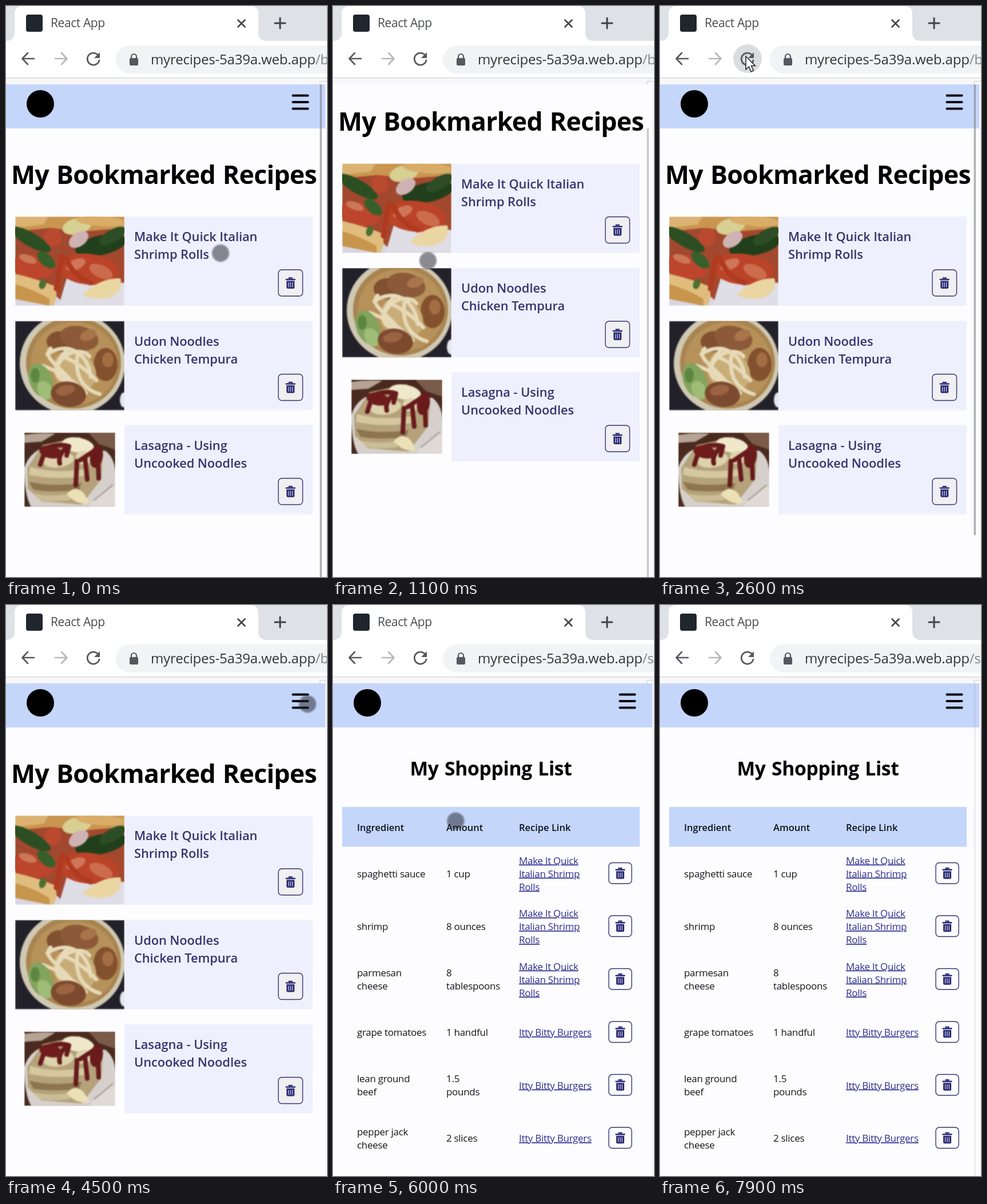
Write an HTML page that moves like this. It is 561 px wide and 998 px high and loops after 8 s.

```html
<!DOCTYPE html>
<html lang="en">
<head>
<meta charset="utf-8">
<title>Recipe app</title>
<style>
html, body { margin: 0; width: 100%; height: 100%; overflow: hidden; background: #fff; }
svg { display: block; width: 561px; height: 998px; }
text { font-family: "Open Sans", "Noto Sans", sans-serif; white-space: pre; }
.h1 { font-weight: 700; font-size: 44.5px; letter-spacing: -.65px; word-spacing: 2px; }
.h2 { font-weight: 700; font-size: 33.6px; letter-spacing: -.3px; word-spacing: 2px; }
.card { font-weight: 600; font-size: 21.8px; letter-spacing: -.05px; fill: #35356f; }
.cell { font-size: 17px; letter-spacing: -.3px; fill: #161616; }
.link { fill: #2d2d90; text-decoration: underline; }
.head { font-weight: 600; font-size: 16.5px; fill: #0e1018; }
.menu { font-size: 22px; fill: #d3d4ea; }
.tab { font-size: 21px; letter-spacing: -.4px; fill: #4a4d52; }
.url { font-size: 24px; letter-spacing: -.2px; fill: #33363a; }
.line { fill: none; stroke-linecap: round; stroke-linejoin: round; }
.soft { filter: blur(1.2px); }
</style>
</head>
<body>
<svg id="stage" viewBox="0 0 561 998"></svg>
<script>
const NAVY = '#2a2b73', SKY = '#c5d6fb';

const text = (x, y, cls, str) => `<text x="${x}" y="${y}" class="${cls}">${str}</text>`;
const rect = (x, y, w, h, fill, more = '') =>
  `<rect x="${x}" y="${y}" width="${w}" height="${h}" fill="${fill}" ${more}/>`;
const oval = (x, y, rx, ry, fill, turn = 0) =>
  `<ellipse rx="${rx}" ry="${ry}" fill="${fill}" transform="translate(${x} ${y}) rotate(${turn})"/>`;
const line = (d, color, w) => `<path class="line" d="${d}" stroke="${color}" stroke-width="${w}"/>`;
const shape = (d, fill) => `<path d="${d}" fill="${fill}"/>`;

function trashButton(x, y, w, h, fill) {
  const cx = x + w / 2, cy = y + h / 2;
  return rect(x, y, w, h, fill, 'rx="6" stroke="#34356f" stroke-width="1.4"') +
    `<g transform="translate(${cx} ${cy})">` +
    line('M-7.5 -6H7.5M-2.6 -8.6H2.6', NAVY, 2.4) +
    shape('M-7 -3.6H7V7.5Q7 10 4.5 10H-4.5Q-7 10 -7 7.5Z', NAVY) +
    line('M-3.4 -.5V7M0 -.5V7M3.4 -.5V7', '#c4c4de', 1.3) + '</g>';
}

// Simplified dishes, each drawn in a box with its corner at 0,0.
const rolls = rect(0, 0, 191, 156, '#a2482e') +
  shape('M0 112L60 128L90 156H0Z', '#d9d6e2') + shape('M76 156L90 108L191 116V156Z', '#dfdde6') +
  shape('M0 0H191V20L120 26L60 20L0 26Z', '#c9954f') + shape('M0 0H58L50 14L0 20Z', '#dcb272') +
  oval(108, 17, 26, 14, '#d8cf93', -14) + oval(150, 8, 44, 9, '#d9ac68', 4) +
  oval(27, 40, 40, 12, '#2b4f22', 30) + oval(150, 50, 46, 17, '#213f1b', -12) +
  oval(170, 34, 26, 11, '#2c4d25', -30) +
  oval(66, 36, 15, 16, '#b9492f') + oval(111, 40, 19, 12, '#cfb3b4', -35) +
  oval(30, 88, 38, 20, '#bd452b', 10) + oval(128, 92, 54, 27, '#bb4327', 6) +
  oval(106, 84, 18, 9, '#cf7658', -24) + oval(150, 96, 22, 11, '#cb6c4d', 25) +
  oval(22, 74, 16, 7, '#cb7757', 20) + oval(54, 76, 19, 10, '#35602a', 42) +
  shape('M0 100Q42 110 70 122Q76 142 66 156Q26 150 0 140Z', '#e0bd7e') +
  shape('M0 118Q34 128 60 144L60 156L0 144Z', '#c8954c') +
  shape('M118 136Q150 106 184 108Q190 132 164 142Q136 148 118 136Z', '#ead6a2') +
  line('M90 74Q100 104 132 116M82 70Q76 100 72 126', '#b03a20', 9) + oval(48, 118, 6, 9, '#4b702f', 20);

const udon = rect(0, 0, 191, 156, '#22212a') +
  oval(100, 74, 92, 89, '#cfc8b2') + oval(102, 73, 83, 80, '#a98450') +
  oval(103, 74, 76, 72, '#b6915a') + oval(78, 36, 23, 18, '#805031') +
  oval(112, 30, 34, 21, '#8c5a38', 12) + oval(158, 76, 21, 29, '#84512f') +
  oval(128, 25, 15, 9, '#a8744c', -20) + oval(162, 68, 10, 13, '#a36e44') +
  oval(104, 88, 40, 34, '#c9ad78', 40) +
  line('M56 58C92 34 128 56 132 98M62 48C44 66 88 84 102 112M72 84C82 52 118 46 130 62M92 50C64 74 66 108 96 103M110 54C104 82 108 116 148 128M48 78Q92 94 124 126M82 62Q112 72 142 104', '#e6dab9', 6.5) +
  oval(45, 104, 20, 31, '#83a45d', -22) + oval(52, 121, 12, 17, '#9fbd76', -30) +
  oval(35, 95, 8, 13, '#5d8640') + oval(93, 128, 31, 22, '#7d4a30', 8) +
  oval(88, 121, 17, 9, '#9a6341', -12) + oval(190, 138, 7, 13, '#e5e7ee');

const lasagna = rect(0, 0, 159, 130, '#4a2a1e') +
  shape('M0 4Q26 0 54 2L30 16L0 18Z', '#b5a494') + shape('M112 0H159V30L130 20Z', '#7a5a48') +
  shape('M0 62Q8 36 34 26L142 32Q159 46 159 72V130H12Q0 110 0 62Z', '#d5d0cb') +
  shape('M5 62L32 22L96 8L138 36L134 82L100 126L30 120L6 98Z', '#b5a27a') +
  shape('M10 60Q58 74 112 62L104 76Q58 84 8 74Z', '#d5c8a0') +
  shape('M8 86Q54 96 100 88L96 100Q50 106 16 100Z', '#8d7550') +
  shape('M14 106Q50 114 82 106L80 118Q46 122 28 118Z', '#cbbd95') +
  oval(60, 48, 27, 13, '#ddd2ac', -8) + oval(94, 22, 28, 13, '#efe8ca', 10) +
  oval(104, 44, 14, 12, '#e0d4ae') +
  line('M32 30Q58 18 78 24L74 40M36 32L28 56M74 26Q58 40 62 54M98 48Q116 36 128 28L130 80M106 44L110 82M92 50L90 92', '#661a1b', 8) +
  oval(46, 34, 20, 11, '#6e1c1c', 12) + oval(126, 42, 11, 20, '#691a1b', 10) +
  shape('M74 108Q88 90 104 106L114 123Q92 128 74 108Z', '#ece0b6') +
  shape('M114 130Q126 102 159 94V130Z', '#dfdad6') + line('M122 118L154 92', '#a89f97', 2.5);

const photo = (x, y, w, h, art) =>
  `<svg x="${x}" y="${y}" width="${w}" height="${h}" style="width:${w}px;height:${h}px"><g class="soft">${art}</g></svg>`;

const header = rect(0, 137, 558, 77, SKY) + '<circle cx="60" cy="171" r="24"/>' +
  line('M501.500 156.500H527.500M501.500 168H527.500M501.500 179.500H527.500', '#08080c', 4.2);

const cards = [
  [368, 'Make It Quick Italian', 'Shrimp Rolls', photo(16, 368, 191, 156, rolls)],
  [550.5, 'Udon Noodles', 'Chicken Tempura', photo(16, 550.5, 191, 156.5, udon)],
  [732.5, 'Lasagna - Using', 'Uncooked Noodles', photo(32, 745.5, 159, 130, lasagna)]
].map(([y, a, b, art]) =>
  rect(207, y, 329, 156, '#eff0fd') + art + text(224, y + 43, 'card', a) +
  text(224, y + 74, 'card', b) + trashButton(476, y + 93, 42.5, 46, '#f0eff1')).join('');

// Stacked lines centred on cy.
const cell = (x, cy, lines, cls = '') => lines.split('|').map((s, i, all) =>
  text(x, cy + 6 + (i - (all.length - 1) / 2) * 23, 'cell ' + cls, s)).join('');

const roll = 'Make It Quick|Italian Shrimp|Rolls', burger = 'Itty Bitty Burgers';
const rows = [
  ['spaghetti sauce', '1 cup', roll],
  ['shrimp', '8 ounces', roll],
  ['parmesan|cheese', '8|tablespoons', roll],
  ['grape tomatoes', '1 handful', burger],
  ['lean ground|beef', '1.5|pounds', burger],
  ['pepper jack|cheese', '2 slices', burger],
  ['spicy brown|mustard', '2|tablespoons', burger],
  ['', '', roll]
].map(([item, amount, link], i) => {
  const cy = 469.5 + i * 92.5;
  return cell(42, cy, item) + cell(198, cy, amount) + cell(325, cy, link, 'link') +
    trashButton(482, cy - 19, 40, 36.5, '#fdfdff');
}).join('');

const browser = rect(0, 0, 561, 137, '#f8f8fa') + rect(0, 0, 561, 62, '#dee1e6') +
  shape('M0 61Q15 61 15 46V14Q15 0 29 0H427Q441 0 441 14V46Q441 61 456 61H561V126H0Z', '#fff') +
  rect(0, 125, 561, 1.6, '#dadbde') +
  rect(35, 15, 29, 30, '#20262e', 'rx="4"') + text(78, 37, 'tab', 'React App') +
  line('M405.500 24.500L417.500 36.500M417.500 24.500L405.500 36.500', '#404347', 2.6) +
  line('M470 30H488M479 21V39', '#404347', 3) +
  '<circle id="hover" cx="153" cy="92" r="25" fill="#dcdde0"/>' +
  line('M49 92H29M38 82L28.500 92L38 102', '#55585d', 2.6) +
  line('M86 92H106M97 82L106.500 92L97 102', '#b5b7ba', 2.6) +
  line('M161 86A10.500 10.500 0 1 0 163 95', '#55585d', 2.8) + shape('M164 81V91H154Z', '#55585d') +
  rect(192, 69, 400, 49, '#f1f3f4', 'rx="24.5"') +
  rect(216, 91, 15, 13, '#55585d', 'rx="2"') + line('M219 91V88.500A4.500 4.500 0 0 1 228 88.500V91', '#55585d', 2.2) +
  '<text x="253" y="102" class="url">myrecipes-5a39a.web.app<tspan id="path" fill="#85888c"></tspan></text>' +
  line('M561 131.500H551Q548.500 131.500 548.500 134V137', '#cfcfd2', 1.2);

const menu = rect(275, 214, 283, 784, NAVY) +
  line('M300 243.500L311 254.500M311 243.500L300 254.500', '#fff', 2.8) +
  text(298, 330, 'menu', 'RECIPE SEARCH') + text(298, 384.5, 'menu', 'SHOPPING LIST') +
  text(298, 439, 'menu', 'BOOKMARKS');

document.getElementById('stage').innerHTML =
  '<defs><clipPath id="view"><rect y="137" width="558" height="861"/></clipPath>' +
  '<radialGradient id="touch"><stop offset=".72" stop-color="#20222a" stop-opacity=".52"/>' +
  '<stop offset=".86" stop-color="#30323a" stop-opacity=".36"/>' +
  '<stop offset="1" stop-color="#40424a" stop-opacity="0"/></radialGradient></defs>' +
  rect(0, 0, 561, 998, '#fdfdff') + browser + rect(558, 137, 3, 861, '#f5f5f8') +
  '<g clip-path="url(#view)">' + rect(0, 137, 558, 861, '#fdfdff') +
  `<g id="page">${header}<g id="marks">${text(9, 310.5, 'h1', 'My Bookmarked Recipes')}${cards}</g>` +
  `<g id="shop">${text(134.5, 298, 'h2', 'My Shopping List')}${rect(16, 353, 520, 69.500, SKY)}` +
  text(42, 395, 'head', 'Ingredient') + text(198, 395, 'head', 'Amount') +
  text(325, 395, 'head', 'Recipe Link') + rows + '</g></g>' +
  `<g id="menu">${menu}</g>` + rect(548.5, 137, 3.5, 861, '#808287', 'id="thumb" rx="1.5"') +
  '<circle id="dot" r="17" fill="url(#touch)"/></g>' +
  '<path id="arrow" d="M0 0V23L5.500 18L9 27L13.500 25L9.500 16.500H16.500Z" fill="#fff" stroke="#222" stroke-width="1.5"/>';

const $ = id => document.getElementById(id);
const hover = $('hover'), path = $('path'), page = $('page'), marks = $('marks'), shop = $('shop'),
  drawer = $('menu'), thumb = $('thumb'), dot = $('dot'), arrow = $('arrow');

// [time, values...]
const pointer = [
  [0, 375, 432], [100, 375, 432], [450, 170, 537.5], [900, 166, 445], [1250, 166, 445],
  [1700, 166, 537.5], [1850, 166, 537.5], [2450, 150, 88], [3700, 150, 88],
  [4400, 527, 173], [4700, 527, 173], [5100, 407, 365], [5300, 407, 374],
  [5600, 407, 374], [6100, 192, 378], [6600, 192, 280], [7250, 192, 280],
  [7650, 192, 378], [7900, 200, 1030], [8000, 200, 1030]
];
const scroll = [[0, 0], [450, 0], [900, 92.5], [1250, 92.5], [1700, 0], [6100, 0],
  [6600, 98], [7250, 98], [7650, 0], [8000, 0]];
const thumbFade = [[0, .62], [900, .62], [1100, .42], [1500, .42], [1700, .6], [2800, .6], [3200, 0],
  [6100, 0], [6200, .5], [7700, .5], [7900, .12], [8000, .12]];
const slide = [[0, 283], [4600, 283], [4800, 0], [8000, 0]];

function at(table, t) {
  const i = table.findIndex(row => row[0] > t);
  const a = table[i - 1], b = table[i];
  const p = (t - a[0]) / (b[0] - a[0]), e = p * p * (3 - 2 * p);
  return a.slice(1).map((v, k) => v + (b[k + 1] - v) * e);
}
const show = (el, on) => el.setAttribute('visibility', on ? 'visible' : 'hidden');
const move = (el, x, y) => el.setAttribute('transform', `translate(${x} ${y})`);

function draw() {
  const t = Math.floor(performance.now() % 8000 / 100) * 100;
  const [x, y] = at(pointer, t), [s] = at(scroll, t);
  const shopping = t >= 5500, inPage = y >= 137;

  move(page, 0, -s);
  show(marks, !shopping);
  show(shop, shopping);
  path.textContent = shopping ? '/shopping' : '/bookmarks';
  show(drawer, t >= 4600 && !shopping);
  move(drawer, at(slide, t)[0], 0);

  thumb.setAttribute('y', 137 + s * .826);
  thumb.setAttribute('height', t >= 1900 && !shopping ? 788 : 861);
  thumb.setAttribute('opacity', at(thumbFade, t)[0]);

  show(dot, inPage);
  move(dot, x, y);
  show(arrow, !inPage);
  move(arrow, x, y);
  show(hover, Math.hypot(x - 153, y - 92) < 25);
  requestAnimationFrame(draw);
}
draw();
</script>
</body>
</html>
```
